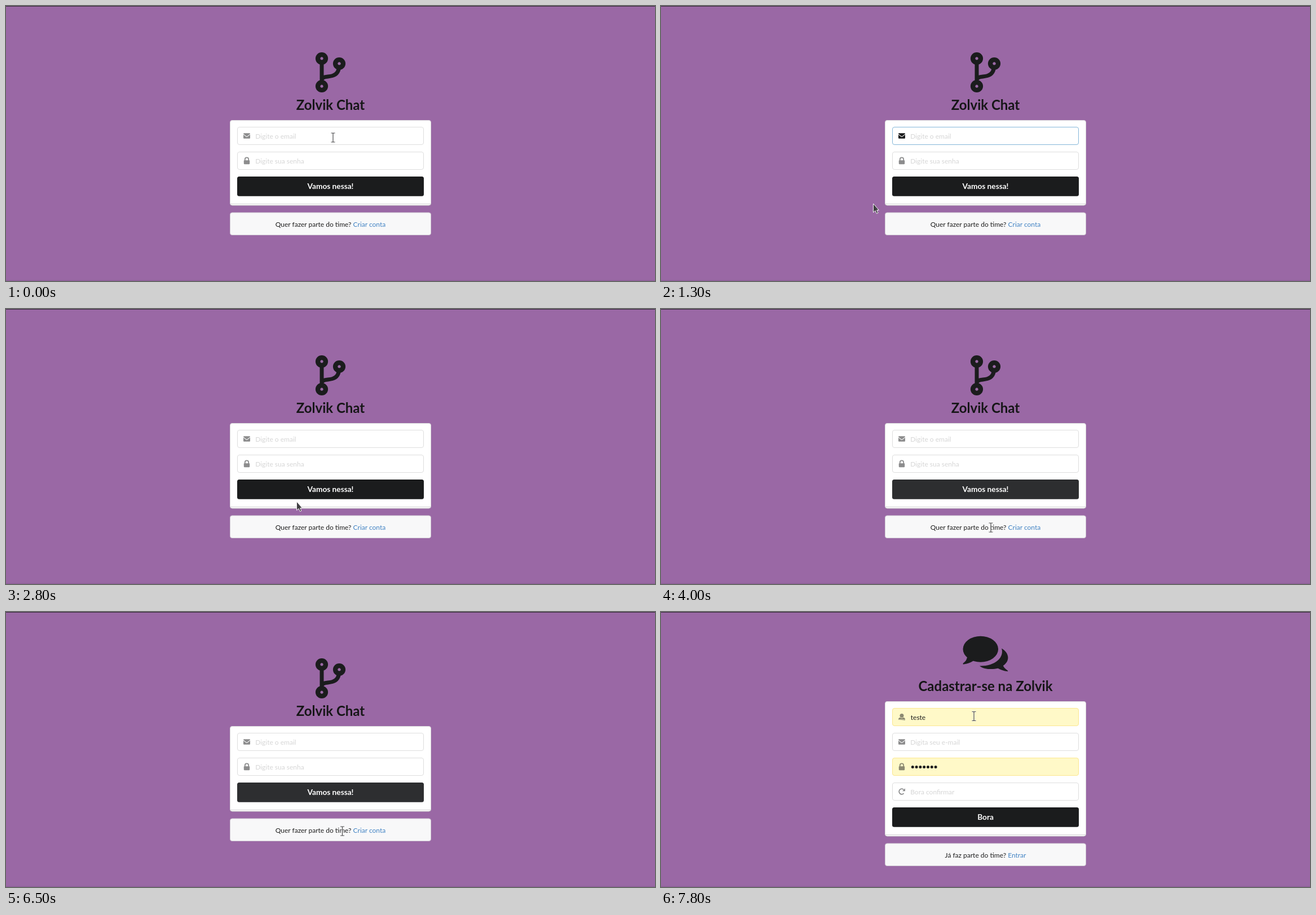
An HTML page for the animation above (8 s loop, 1151 by 487 pixels).

```html
<!DOCTYPE html>
<html lang="pt-BR">
<head>
<meta charset="utf-8">
<title>Zolvik Chat</title>
<style>
  html, body { margin: 0; width: 100%; height: 100%; overflow: hidden; background: #9a68a5; }
  svg { display: block; }
  text { font: 12px Lato, sans-serif; fill: #1d1d1d; white-space: pre; }
  .mid { text-anchor: middle; }
  .title { font-size: 24px; font-weight: 700; fill: #161617; }
  .label { font-size: 13.7px; font-weight: 700; fill: #fff; }
  .hint { fill: #d6d6d6; }
  .link { fill: #4183c4; }
  .link.hover { fill: #1e70bf; }
  .ink { fill: #1b1c1d; }
  .box { fill: #fff; stroke: #dedede; }
  .icon { opacity: .5; fill: #1b1c1d; stroke: none; }
  .focus .box { stroke: #85b7d9; }
  .focus .icon { opacity: 1; }
  .filled .box { fill: #fffbdc; stroke: #fbe791; }
  .settled .filled .box { fill: #fff9c8; }
  .cursor { fill: #3f3f41; stroke: #f4f0f5; stroke-width: 1; stroke-linejoin: round; }
  .beam { fill: none; stroke: #4b4b4d; stroke-width: 1.2; }
</style>
</head>
<body>
<svg id="stage" width="1151" height="487" viewBox="0 0 1151 487">
  <defs>
    <g id="mail">
      <path d="M-6-3.6Q-6-4.7-4.9-4.7H4.9Q6-4.7 6-3.6L1 .4Q0 1.2-1 .4Z"/>
      <path d="M-6-2.2-1.3 1.6Q0 2.5 1.3 1.6L6-2.2V3.7Q6 4.8 4.9 4.8H-4.9Q-6 4.8-6 3.7Z"/>
    </g>
    <g id="lock">
      <rect x="-5.2" y="-.8" width="10.4" height="7" rx="1.1"/>
      <path d="M-3.2 0V-2.5a3.2 3.2 0 0 1 6.4 0V0" fill="none" stroke="#1b1c1d" stroke-width="1.8"/>
    </g>
    <g id="user">
      <circle cy="-2.6" r="3.5"/>
      <path d="M-6 4.6Q-6 1.2-3 .8Q0 2.6 3 .8Q6 1.2 6 4.6Q6 6-4.6 6Q-6 6-6 4.6ZM-5 6H5Q6 6 6 4.6H-6Q-6 6-5 6Z"/>
    </g>
    <g id="redo">
      <path d="M3.6 3.2A4.8 4.8 0 1 1 3.4-3.4" fill="none" stroke="#1b1c1d" stroke-width="1.8"/>
      <path d="M6-5.8V-.8H1Z"/>
    </g>
    <path id="arrow" class="cursor" d="M.5 0V15.6L4 12.4 6.4 17.6 8.9 16.5 6.7 11.5H10.4Z"/>
    <path id="hand" class="cursor" d="M-1.7 1.5Q-1.7 0 0 0T1.7 1.5V5.6Q3.3 4.9 4.3 6Q5.8 5.5 6.6 6.8Q8.6 6.5 8.6 8.6V12.6Q8.6 14.5 7.4 16V17.7H-1.5V16L-5.5 11Q-6.6 9.3-5.2 8.8Q-4 8.4-1.7 11Z"/>
    <g id="beam">
      <path d="M-3.5-8H-1Q0-8 0-7V7Q0 8-1 8H-3.5M3.5-8H1Q0-8 0-7M0 7Q0 8 1 8H3.5" fill="none" stroke="#fff" stroke-opacity=".6" stroke-width="2.4"/>
      <path class="beam" d="M-3.5-8H-1Q0-8 0-7V7Q0 8-1 8H-3.5M3.5-8H1Q0-8 0-7M0 7Q0 8 1 8H3.5"/>
    </g>
  </defs>
  <rect width="1151" height="487" fill="#9a68a5"/>
  <rect width="1151" height="1" fill="#352b39"/>
  <rect y="485.5" width="1151" height="1.5" fill="#8c5f97"/>
  <g id="login">
    <g fill="none" stroke="#1b1c1d">
      <path d="M560 93V142M560 131C561 124 570 126 579 123.500Q591 120 591 104" stroke-width="7"/>
      <g stroke-width="8.6">
        <circle cx="560" cy="93" r="6.800"/>
        <circle cx="591" cy="102" r="6.800"/>
        <circle cx="560" cy="142" r="6.800"/>
      </g>
    </g>
    <g fill="#9a68a5">
      <circle cx="560" cy="93" r="2.500"/>
      <circle cx="591" cy="102" r="2.500"/>
      <circle cx="560" cy="142" r="2.500"/>
    </g>
  </g>
  <g id="signup">
    <g class="ink">
      <ellipse cx="566.800" cy="65.800" rx="31.300" ry="23"/>
      <path d="M543 80C541.800 86 539 88.300 536 90.500C535 92 535.600 92.800 537 92.600Q546 91.500 554 86.500Z"/>
      <path d="M604 64.500C611 68 615.600 75 615.400 81C615.200 87 612 91.500 606.800 95C608 98.500 611 101 614.500 103.400C616 104.500 615.300 105.300 614 105.100Q606 104.300 597.500 99.800C588 102 573 102 565 95.400C577 95.800 589 93 597 86C604 80 606.500 72 604 64.500Z"/>
    </g>
  </g>
  <use id="pointer" href="#beam"/>
</svg>
<script>
const $ = id => document.getElementById(id);
const CENTER = 575.5;

const rect = (x, y, w, h, r, attrs) =>
  `<rect x="${x}" y="${y}" width="${w}" height="${h}" rx="${r}" ${attrs}/>`;

const text = (x, y, cls, body) => `<text x="${x}" y="${y}" class="${cls}">${body}</text>`;

const dots = (y, count) => Array.from({ length: count }, (_, i) =>
  `<circle class="ink" cx="${446.3 + 6.8 * i}" cy="${y}" r="2.5"/>`).join('');

function field(y, icon, content, cls = '') {
  return `<g class="${cls}">${rect(410.5, y + .5, 330, 31, 3.5, 'class="box"')}
    <use href="#${icon}" class="icon" x="427" y="${y + 16}"/>${content}</g>`;
}

const hint = (y, body) => text(442.2, y + 20.7, 'hint', body);

// Everything below the title hangs on the top of the card and its button.
function panel({ title, top, rows, button, label, ask, link }) {
  return text(CENTER, top - 18, 'mid title', title) +
    rect(397, top + 1, 357, button + 51 - top, 4, 'fill="#000" opacity=".13"') +
    rect(397.5, top + .5, 356, button + 50.5 - top, 3.5, 'fill="#fff" stroke="#d8d6d9"') +
    `<path d="M398 ${button + 48.5}H753" stroke="#d3d3d4"/>` +
    rows +
    rect(410, button, 331, 34.7, 3.5, 'class="ink button"') +
    text(CENTER, button + 22.3, 'mid label', label) +
    rect(397.5, button + 63.9, 356, 39.6, 3.5, 'fill="#f8f8f9" stroke="#d0c8d3"') +
    text(CENTER, button + 88.7, 'mid', `${ask} <tspan class="link">${link}</tspan>`);
}

$('login').insertAdjacentHTML('beforeend', panel({
  title: 'Zolvik Chat', top: 202, button: 302, label: 'Vamos nessa!',
  rows: field(214, 'mail', hint(214, 'Digite o email'), 'email') +
        field(258, 'lock', hint(258, 'Digite sua senha')),
  ask: 'Quer fazer parte do time?', link: 'Criar conta'
}));

$('signup').insertAdjacentHTML('beforeend', panel({
  title: 'Cadastrar-se na Zolvik', top: 158, button: 346, label: 'Bora',
  rows: field(170, 'user', text(442.8, 190.7, '', 'teste'), 'filled') +
        field(214, 'mail', hint(214, 'Digita seu e-mail')) +
        field(258, 'lock', dots(274.5, 7), 'filled') +
        field(302, 'redo', hint(302, 'Bora confirmar')),
  ask: 'Já faz parte do time?', link: 'Entrar'
}));

// Pointer path: tick (100 ms), x, y
const path = [
  [0, 580, 233], [3, 580, 233], [4, 572, 246], [6, 495, 305], [7, 495, 305],
  [10, 405, 342], [13, 376, 350], [14, 376, 350], [16, 382, 304],
  [18, 300, 190], [19, 320, 143], [22, 668, 200], [23, 676, 240],
  [25, 510, 303], [27, 510, 303], [28, 515, 341], [29, 518, 332],
  [32, 530, 325], [36, 530, 325], [40, 585, 387], [45, 560, 380],
  [47, 515, 354], [51, 515, 354], [52, 519, 359], [56, 550, 306],
  [59, 562, 313], [60, 562, 313], [63, 585, 396], [65, 596.5, 388],
  [67, 596.5, 388], [70, 625, 389], [73, 629.5, 388], [74, 629.5, 388],
  [75, 585, 350], [76, 585, 350], [78, 555, 184.5], [80, 555, 184.5]
];

function locate(tick) {
  const i = path.findIndex(p => p[0] > tick);
  const [t0, x0, y0] = path[i - 1], [t1, x1, y1] = path[i];
  const k = (tick - t0) / (t1 - t0);
  return [x0 + (x1 - x0) * k, y0 + (y1 - y0) * k];
}

function shape(x, y, joined) {
  const within = (l, t, r, b) => x >= l && x <= r && y >= t && y <= b;
  const tops = joined ? [170, 214, 258, 302] : [214, 258];
  const button = joined ? 346 : 302;
  if (tops.some(t => within(410, t, 741, t + 32))) return 'beam';
  if (within(410, button, 741, button + 35)) return 'hand';
  if (!joined && within(613, 379, 672, 394)) return 'hand';
  if (!joined && (within(479, 379, 612, 394) || within(515, 163, 636, 188))) return 'beam';
  return 'arrow';
}

const email = document.querySelector('.email');
const loginButton = document.querySelector('#login .button');
const loginLink = document.querySelector('#login .link');
const during = (tick, from, to) => tick >= from && tick < to;

function draw(now) {
  const tick = Math.floor(now % 8000 / 100);
  const joined = tick >= 74;
  const [x, y] = locate(tick);
  $('login').style.display = joined ? 'none' : '';
  $('signup').style.display = joined ? '' : 'none';
  $('signup').classList.toggle('settled', tick >= 77);
  email.classList.toggle('focus', during(tick, 3, 14));
  loginLink.classList.toggle('hover', during(tick, 69, 74));
  loginButton.style.fill = during(tick, 37, 71) ? '#2d2e30' : during(tick, 29, 37) ? '#27292a' : '';
  $('pointer').setAttribute('href', '#' + shape(x, y, joined));
  $('pointer').setAttribute('transform', `translate(${x} ${y})`);
}

const start = performance.now();
function loop() {
  draw(performance.now() - start);
  requestAnimationFrame(loop);
}
loop();
</script>
</body>
</html>
```
